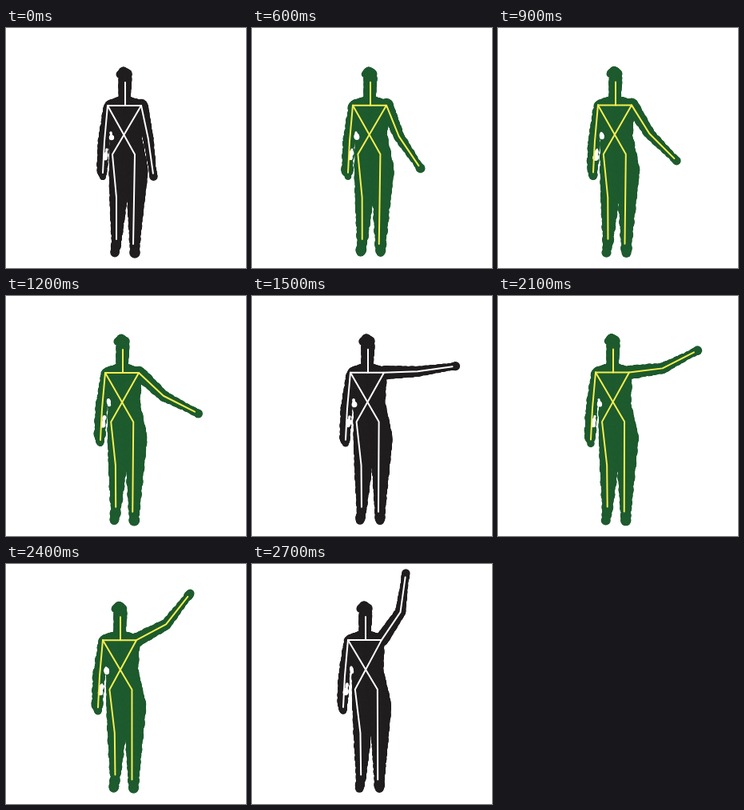
Animation, 300 px wide and 300 px high, one loop 3700 ms. Source, as an HTML page with a canvas:

```html
<!DOCTYPE html>
<html lang="en">
<head>
<meta charset="utf-8">
<title>Raised arm</title>
<style>
html, body { margin: 0; width: 100%; height: 100%; overflow: hidden; background: #fff; }
canvas { display: block; }
</style>
</head>
<body>
<canvas id="stage" width="300" height="300"></canvas>
<script>
const ctx = document.getElementById('stage').getContext('2d');
const BLACK = { body: '#211e1f', bone: '#fff', rough: 0.45 };
const GREEN = { body: '#1e5b2e', bone: '#f4ee50', rough: 0.8 };

// Angles in degrees, 0 points right and positive points down
const poses = [
  { hold: 600, upper: 78, fore: 82 },
  { hold: 300, upper: 68, fore: 56 },
  { hold: 300, upper: 58, fore: 45 },
  { hold: 300, upper: 43, fore: 27 },
  { hold: 600, upper: -2, fore: -8 },
  { hold: 300, upper: -7, fore: -27 },
  { hold: 300, upper: -28, fore: -52 },
  { hold: 1000, upper: -56, fore: -82 }
];
const LOOP = poses.reduce((sum, pose) => sum + pose.hold, 0);

// Chains of [x, y, radius]
const hair = [[142, 58, 4.5], [147, 54, 5.5], [152, 58, 6]];
const head = [[149, 63, 8.5], [148, 90, 7.5]];
const shoulders = [[130, 97, 7], [148, 91, 7], [167, 97, 7]];
const leftBody = [[139, 102, 12], [142, 135, 12], [142, 178, 13], [140, 225, 10], [138, 268, 6], [136, 281, 5.5]];
const rightBody = [[160, 102, 12], [157, 135, 12], [164, 178, 13.5], [162, 225, 10], [161, 268, 6.5], [161, 281, 6]];
const leftArm = [[128, 98, 6], [122, 142, 7], [120, 178, 6.5], [121, 186, 4]];

const leftShoulder = [127, 97], rightShoulder = [169, 97];
const leftHip = [133, 158], rightHip = [161, 158];
const bodyBones = [
  [[149, 68], [149, 97]],
  [leftShoulder, rightShoulder, leftHip, [138, 212], [138, 264]],
  [leftShoulder, rightHip, [159, 270]]
];
const armBone = [leftShoulder, [123, 142], [121, 181]];

const wave = k => Math.sin(k * 0.8) + 0.6 * Math.sin(k * 0.37 + 1);

function reach([x, y], degrees, length) {
  const a = degrees * Math.PI / 180;
  return [x + length * Math.cos(a), y + length * Math.sin(a)];
}

function limb(chain, rough, seed) {
  for (let i = 1; i < chain.length; i++) {
    const [x, y, r] = chain[i - 1], [nx, ny, nr] = chain[i];
    const length = Math.hypot(nx - x, ny - y);
    for (let d = 0; d <= length; d++) {
      const t = d / length;
      const radius = r + (nr - r) * t + rough * wave(x + y + d + seed);
      ctx.beginPath();
      ctx.arc(x + (nx - x) * t, y + (ny - y) * t, radius, 0, 7);
      ctx.fill();
    }
  }
}

function stroke(points) {
  ctx.beginPath();
  points.forEach(p => ctx.lineTo(...p));
  ctx.stroke();
}

function draw(pose, index) {
  const look = pose.hold > 300 ? BLACK : GREEN;
  const seed = index * 11;
  // The torso leans further left as the arm rises; the hanging arm follows the shoulder
  const move = ([x, y, r], k) => [x - index * k, y - 0.3 * index * k, r];
  const hang = p => move(p, 1);
  const place = p => {
    const height = Math.min(1, Math.max(0, (285 - p[1]) / 188));
    return move(p, 0.25 * (height > 0) + 0.75 * height ** 2);
  };

  const shoulder = place(rightShoulder).slice(0, 2);
  const elbow = reach(shoulder, pose.upper, 42);
  const wrist = reach(elbow, pose.fore, 40);
  const hand = reach(elbow, pose.fore, 49);

  ctx.fillStyle = '#fff';
  ctx.fillRect(0, 0, 300, 300);

  ctx.fillStyle = look.body;
  for (const chain of [hair, head, shoulders]) limb(chain.map(place), 0.2, seed);
  for (const chain of [leftBody, rightBody]) limb(chain.map(place), look.rough, seed);
  limb(leftArm.map(hang), look.rough, seed);
  limb([[...shoulder, 8.5], [...elbow, 6.5], [...wrist, 4.5], [...hand, 5.5]], look.rough / 2, seed);

  // Light showing between the hanging arm and the waist
  ctx.fillStyle = '#fff';
  limb([[131, 131, 1.5], [132, 137, 3]].map(hang), 0.5, seed);
  limb([[126, 152, 1.5], [124, 163, 3]].map(hang), 0.5, seed);

  ctx.strokeStyle = look.bone;
  ctx.lineWidth = 2;
  ctx.lineCap = ctx.lineJoin = 'round';
  bodyBones.forEach(bone => stroke(bone.map(place)));
  stroke(armBone.map(hang));
  stroke([shoulder, elbow, reach(elbow, pose.fore, 44)]);
}

function tick() {
  let time = performance.now() % LOOP, index = 0;
  while (time >= poses[index].hold) time -= poses[index++].hold;
  draw(poses[index], index);
  requestAnimationFrame(tick);
}
tick();
</script>
</body>
</html>
```
